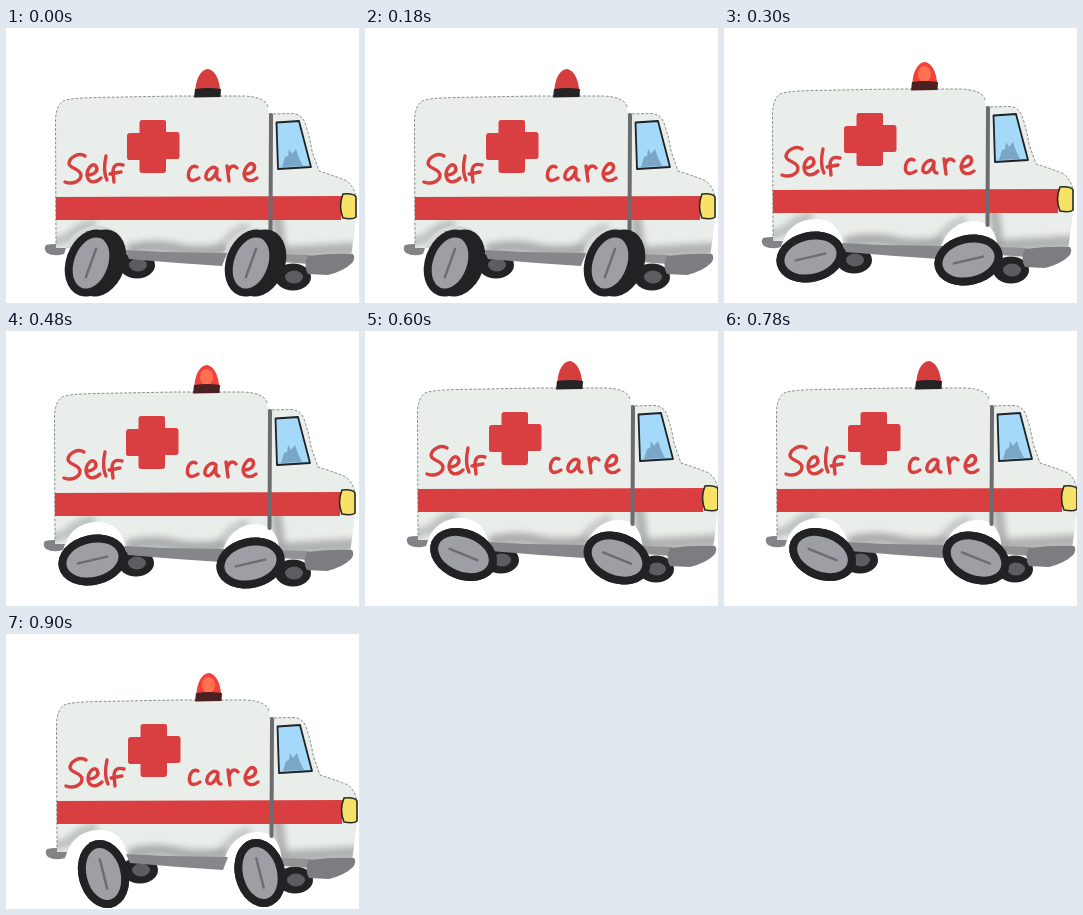
Recreate the animation shown at these times as an HTML page. Size 353 by 275 pixels, loop 1.2 s.

```html
<!DOCTYPE html>
<html lang="en">
<head>
<meta charset="utf-8">
<title>Self care ambulance</title>
<style>
  html, body { margin: 0; width: 100%; height: 100%; overflow: hidden; background: #fff; }
  svg { display: block; width: 100%; height: 100%; }
  .ink { fill: none; stroke-linecap: round; stroke-linejoin: round; }
</style>
</head>
<body>
<svg viewBox="0 0 353 275" role="img" aria-label="Self care">
  <defs>
    <path id="shell" d="M50 220 L49.500 92 Q50 78 57 73 Q64 70 90 69.500 L170 68 L238 68 Q260 69 262 79 L263 86
      L286 85.500 Q296 86 299 95 Q304 109 306 123 L313 143 Q332 149 341 153 Q349 160 350 170 L350 192 L345 229 L302 234
      L274 232 C276 212 266 200 251 200 C234 200 221 212 217 230 L121 225
      C118 207 108 198 93 198 C77 198 65 206 60 220 Z"/>
    <clipPath id="inside"><use href="#shell"/></clipPath>
    <filter id="soft" x="-50%" y="-50%" width="200%" height="200%"><feGaussianBlur stdDeviation="3"/></filter>
    <g id="far">
      <ellipse rx="18" ry="13.500" fill="#232325"/>
      <ellipse cx="1" rx="9" ry="6.500" fill="#5c5c61"/>
    </g>
    <ellipse id="tyre" rx="34.500" ry="25" fill="#222224"/>
    <g id="near">
      <use href="#tyre"/>
      <ellipse rx="26.500" ry="17" fill="#9e9fa5"/>
      <path d="M-15 0H15" stroke="#6c6c74" stroke-width="2.500" stroke-linecap="round"/>
    </g>
  </defs>

  <use class="far" href="#far"/>
  <use class="far" href="#far"/>

  <g id="van">
    <path d="M40 217 Q48 215 61 217 L58 226 Q48 229 41 225 Q37 221 40 217Z" fill="#828287"/>
    <use href="#shell" fill="#e9eeea"/>
    <path id="wells" fill="#d5d9d6" d="M60 220 C65 206 77 198 93 198 C108 198 118 207 121 225Z
      M217 230 C221 212 234 200 251 200 C266 200 276 212 274 232Z"/>
    <g clip-path="url(#inside)">
      <g class="ink" filter="url(#soft)" stroke="#9c9e9f">
        <path d="M48 214 L62 210 Q72 199 86 196" stroke-width="9" opacity=".6"/>
        <path d="M126 221 Q150 216 170 221 T216 222" stroke-width="12" opacity=".8"/>
        <path d="M216 218 Q226 204 240 199" stroke-width="8" opacity=".5"/>
        <path d="M270 182 L275 222" stroke-width="11" opacity=".75"/>
        <path d="M278 225 L350 221" stroke-width="13" opacity=".75"/>
      </g>
      <path d="M48 169 L336 168 L335 192 L48 192Z" fill="#d93f41"/>
    </g>
    <path d="M119 222 L160 224 L221 225 L216 238 Q168 235 123 231Z" fill="#87878b"/>
    <path d="M274 226 L304 227 L303 236 L276 234Z" fill="#939396"/>
    <path d="M302 228 Q326 225 347 226 Q350 230 346 235 Q338 243 322 247 L302 246 Q297 237 302 228Z" fill="#7c7c81"/>

    <g class="ink" stroke="#6f7271" stroke-width=".8" stroke-dasharray="2 2.5">
      <path d="M50 215 L49.500 92 Q50 78 57 73 Q64 70 90 69.500 L170 68 L238 68 Q260 69 262 79"/>
      <path d="M263 86 L286 85.500 Q296 86 299 95 Q304 109 306 123 L313 143 Q332 149 341 153 Q349 160 350 170"/>
    </g>
    <path d="M265 87 L264.500 204" class="ink" stroke="#6b6b70" stroke-width="4"/>

    <path d="M270.500 94.500 L293 93 Q299 116 305 139 L272 141Z" fill="#a4d9fa"/>
    <path d="M276 139 L279 129 L282 128 L283 121 L286 126 L290 121 L293 130 L297 138Z" fill="#7ba6c5"/>
    <path d="M270.500 94.500 L293 93 Q299 116 305 139 L272 141Z" class="ink" stroke="#1d2227" stroke-width="1.800"/>
    <path d="M337 166 Q348 165 350 169 L350 189 Q347 192 337 190 Q332 178 337 166Z" fill="#f7e267" stroke="#2b2923" stroke-width="1.600"/>

    <path d="M136 92 H158 Q160 92 160 94 V104 H171 Q173.500 104 173.500 107 V129 Q173.500 131 171 131 H160 V142 Q160 145 157 145
      H136 Q133.500 145 133.500 142 V132 H123 Q121 132 121 129 V108 Q121 105 124 105 H133.500 V95 Q133.500 92 136 92Z" fill="#d93f41"/>

    <g class="ink" stroke="#d8403f" stroke-width="3.400">
      <path d="M79 128 C73 124 64 129 63 135 C63 141 74 140 75 147 C75 153 67 157 59 154"/>
      <path d="M82 147 C88 147 93 143 90 138 C86 134 81 141 81 147 C82 155 89 156 95 150"/>
      <path d="M100 128 C98 137 98 146 101 152"/>
      <path d="M117 137 C110 135 107 138 107 144 L108 154 M104 146 L115 144"/>
      <path d="M191 139 C185 136 182 143 182.500 149 C184 154 189 153 193 150"/>
      <path d="M211 141 C206 136 199 144 200 150 C203 155 209 149 211 142 C210 148 211 152 214 152"/>
      <path d="M221 138 L223 153 M222 145 C223 138 228 136 231 140"/>
      <path d="M239 146 C246 146 250 142 248 137 C244 133 239 139 238 146 C239 154 246 154 251 150"/>
    </g>

    <path id="dome" d="M189.500 61 C190 51 195 41 202 41 C209 42 213 51 214 61Z"/>
    <ellipse id="glow" cx="201.500" cy="53" rx="6.500" ry="8" fill="#ff7150"/>
    <path id="base" d="M189 61 Q202 59 215 61 L214.500 69 L188 69.500Z"/>
  </g>

  <use class="shade" href="#tyre"/>
  <use class="shade" href="#tyre"/>
  <use class="near" href="#near"/>
  <use class="near" href="#near"/>
</svg>
<script>
  const STEP = 300;
  // van offset, wheel angle, wheel centres, far wheel centres, lamp state;
  // depth: how far the dark inner side of the wheels shows
  const poses = [
    { van: [0, 0],   turn: -70, near: [[85, 235], [245, 235]], far: [[131, 237], [287, 249]], lit: false, depth: 9 },
    { van: [-1, -7], turn: -13, near: [[86.5, 229], [244.5, 232]], far: [[130, 232], [287, 242]], lit: true, depth: 0 },
    { van: [3, -11], turn: 22,  near: [[98.5, 223.5], [252, 227]], far: [[136, 229], [291, 238]], lit: false, depth: 0 },
    { van: [1, -2],  turn: 76,  near: [[97.5, 240], [254, 239]], far: [[134, 236], [289, 246]], lit: true, depth: 0 }
  ];
  const byId = id => document.getElementById(id);
  const byClass = name => document.querySelectorAll('.' + name);
  const wheels = byClass('near'), shades = byClass('shade'), farWheels = byClass('far');
  const place = (el, [x, y], turn = 0) =>
    el.setAttribute('transform', `translate(${x} ${y}) rotate(${turn})`);
  let shown = null;

  function show(pose) {
    place(byId('van'), pose.van);
    pose.near.forEach(([x, y], i) => {
      place(wheels[i], [x, y], pose.turn);
      place(shades[i], [x + pose.depth, y], pose.turn);
      place(farWheels[i], pose.far[i]);
    });
    byId('wells').setAttribute('opacity', pose.depth ? 1 : 0);
    byId('dome').setAttribute('fill', pose.lit ? '#f2403b' : '#d63d3d');
    byId('base').setAttribute('fill', pose.lit ? '#4b2020' : '#242426');
    byId('glow').setAttribute('opacity', pose.lit ? 1 : 0);
  }

  const start = performance.now();
  function tick() {
    const elapsed = performance.now() - start;
    const pose = poses[Math.floor(elapsed / STEP) % poses.length];
    if (pose !== shown) show(shown = pose);
    requestAnimationFrame(tick);
  }
  tick();
</script>
</body>
</html>
```
